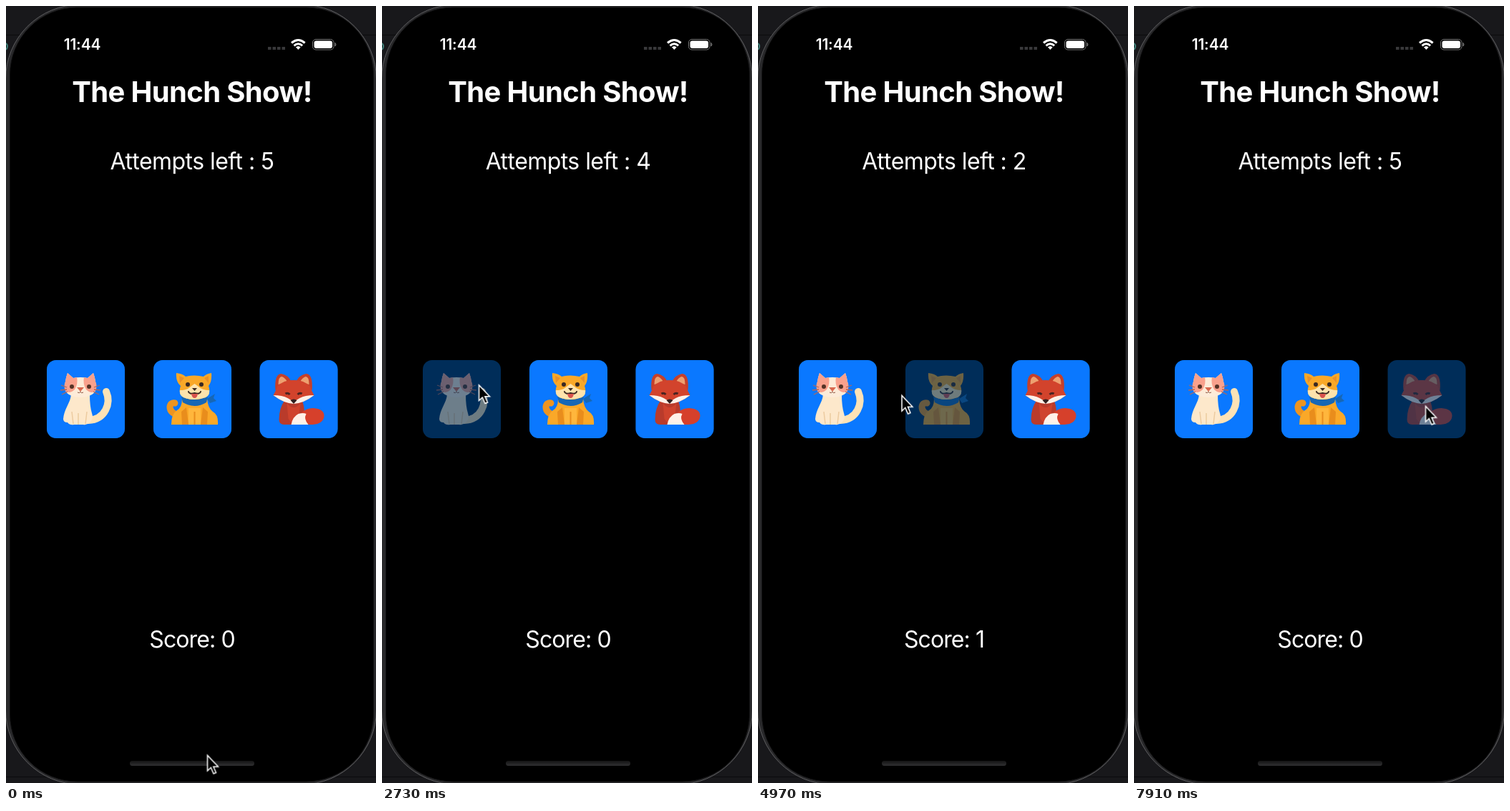
An HTML page for the animation above (8 s loop, 517 px wide and 1084 px high).

```html
<!DOCTYPE html>
<html lang="en">
<head>
<meta charset="utf-8">
<title>The Hunch Show!</title>
<style>
@property --on { syntax: "<number>"; inherits: true; initial-value: 1; }
html, body { margin: 0; width: 100%; height: 100%; overflow: hidden; background: #18181b; }
svg { display: block; width: 517px; height: 1084px; }
text { font-family: Inter, Roboto, sans-serif; fill: #fff; text-anchor: middle; }
.title { font-size: 40px; font-weight: 700; letter-spacing: -.65px; }
.label { font-size: 32px; letter-spacing: -.55px; }
.score { letter-spacing: -.9px; }
.clock { font-size: 21px; font-weight: 600; letter-spacing: -.15px; }

.tile .face { fill: #0a78ff; opacity: var(--on); }
.tile .art { opacity: calc(.43 + .57 * var(--on)); }
.tile, #cursor { animation: 8s linear infinite; }
#cat { animation-name: cat; }
#dog { animation-name: dog; }
#fox { animation-name: fox; }
@keyframes cat {
  0%, 32.74% { --on: 1 } 32.75%, 35.75% { --on: 0 }
  37%, 44.49% { --on: 1 } 44.5%, 47.25% { --on: 0 }
  48.5%, 74.74% { --on: 1 } 74.75%, 77.5% { --on: 0 }
  78.75%, 100% { --on: 1 }
}
@keyframes dog {
  0%, 60.74% { --on: 1 } 60.75%, 63.75% { --on: 0 } 65%, 100% { --on: 1 }
}
@keyframes fox {
  0%, 97.49% { --on: 1 } 97.5%, 100% { --on: 0 }
}

/* counters: each value is shown only in its own time window */
.count text { opacity: 0; animation: 8s step-end infinite; }
#left5 { animation-name: left5; }
#left4 { animation-name: left4; }
#left3 { animation-name: left3; }
#left2 { animation-name: left2; }
#left1 { animation-name: left1; }
#score0 { animation-name: score0; }
#score1 { animation-name: score1; }
@keyframes left5 { 0% { opacity: 1 } 33.5% { opacity: 0 } 98.25%, 100% { opacity: 1 } }
@keyframes left4 { 0% { opacity: 0 } 33.5% { opacity: 1 } 45.25%, 100% { opacity: 0 } }
@keyframes left3 { 0% { opacity: 0 } 45.25% { opacity: 1 } 61.5%, 100% { opacity: 0 } }
@keyframes left2 { 0% { opacity: 0 } 61.5% { opacity: 1 } 75.5%, 100% { opacity: 0 } }
@keyframes left1 { 0% { opacity: 0 } 75.5% { opacity: 1 } 98.25%, 100% { opacity: 0 } }
@keyframes score0 { 0% { opacity: 1 } 61.5% { opacity: 0 } 98.25%, 100% { opacity: 1 } }
@keyframes score1 { 0% { opacity: 0 } 61.5% { opacity: 1 } 98.25%, 100% { opacity: 0 } }

#cursor { animation-name: cursor; animation-timing-function: ease-in-out; }
@keyframes cursor {
  0%, 3% { transform: translate(281.5px, 1045.5px) }
  15.5%, 18% { transform: translate(136.5px, 530.5px) }
  22%, 49% { transform: translate(135.5px, 529px) }
  57%, 65% { transform: translate(201px, 543.5px) }
  72.5%, 80% { transform: translate(133.5px, 552px) }
  93%, 100% { transform: translate(407.5px, 558.5px) }
}
</style>
</head>
<body>
<svg viewBox="0 0 517 1084">
  <defs>
    <linearGradient id="bar" x2="0" y2="1">
      <stop stop-color="#141414"/><stop offset="1" stop-color="#303032"/>
    </linearGradient>
    <path id="catPatch" fill="#f9a18c" d="M29 18L37 25 42 24Q44 33 39 41 32 48 26 43 23 36 26 30 27 23 29 18Z"/>
    <path id="foxEar" d="M22 42Q20 20 30 19 39 20 45 31Z"/>
  </defs>

  <!-- desktop and phone body -->
  <rect width="517" height="1084" fill="#18181b"/>
  <path d="M0 40.5H517M0 1075.5H517" stroke="#0b0b0d"/>
  <path d="M0 52Q4 56 0 61" fill="none" stroke="#3f7f78" stroke-width="2"/>
  <rect x="-.5" y="-2" width="518" height="1088" rx="104" fill="#29292b" stroke="#5c5c5e"/>
  <rect x="5.5" y="2" width="508" height="1080" rx="94" stroke="#101011"/>

  <!-- status bar -->
  <text class="clock" x="106.5" y="61">11:44</text>
  <path d="M366 59H390" stroke="#39393b" stroke-width="4" stroke-dasharray="4.5 2"/>
  <g fill="none" stroke="#fff" stroke-width="3">
    <path d="M399 51.5Q408.3 43.5 417.6 51.5M402.5 55.3Q408.3 50.2 414.1 55.3"/>
    <path d="M405.5 57.5Q408.3 55.5 411.1 57.5L408.3 60.5Z" fill="#fff" stroke-width="1"/>
  </g>
  <rect x="428.5" y="46.5" width="29.5" height="14.5" rx="4.5" fill="none" stroke="#777"/>
  <rect x="430.5" y="48.5" width="25.5" height="10.5" rx="3" fill="#fff"/>
  <path d="M460 51.5Q462 53.8 460 56Z" fill="#777" stroke="#777"/>

  <text class="title" x="260" y="134">The Hunch Show!</text>
  <g class="label count">
    <text id="left5" x="260" y="228">Attempts left : 5</text>
    <text id="left4" x="260" y="228">Attempts left : 4</text>
    <text id="left3" x="260" y="228">Attempts left : 3</text>
    <text id="left2" x="260" y="228">Attempts left : 2</text>
    <text id="left1" x="260" y="228">Attempts left : 1</text>
    <text id="score0" class="score" x="260" y="895">Score: 0</text>
    <text id="score1" class="score" x="260" y="895">Score: 1</text>
  </g>

  <g transform="translate(57 494)"><g id="cat" class="tile">
    <rect width="109" height="109" rx="13" fill="#002d59"/>
    <rect class="face" width="109" height="109" rx="13"/>
    <g class="art">
      <path d="M58 84C82 83 90 60 83 44" fill="none" stroke="#fde2b6" stroke-width="10" stroke-linecap="round"/>
      <path d="M34 48C33 60 24 68 23 82Q23 87 29 87 32 91 38 90H51Q56 91 60 87 66 82 63 74 60 64 60 48Z" fill="#fde8cb"/>
      <path d="M35 72L37 89M44 74V90M56 72L54 89" fill="none" stroke="#eccba0" stroke-width="1.5"/>
      <path d="M29 18L37 25Q47 23 57 25L65 18Q67 23 68 30 74 51 47 52 20 51 26 30 27 23 29 18Z" fill="#fdebd8"/>
      <use href="#catPatch"/>
      <use href="#catPatch" transform="matrix(-1 0 0 1 94 0)"/>
      <path d="M28 38L20 35M28 41L19 42M29 44L21 48M66 38L74 35M66 41L75 42M65 44L73 48" stroke="#b0665a" stroke-width="1.3"/>
      <circle cx="35" cy="37" r="3" fill="#553326"/>
      <circle cx="59" cy="37" r="3" fill="#553326"/>
      <path d="M42 38H52L47 44Z" fill="#d9694f"/>
      <path d="M43 45Q46 47 47 44 48 47 51 45" fill="none" stroke="#8d5946"/>
    </g>
  </g></g>

  <g transform="translate(206 494)"><g id="dog" class="tile">
    <rect width="109" height="109" rx="13" fill="#002d59"/>
    <rect class="face" width="109" height="109" rx="13"/>
    <g class="art">
      <path d="M34 76Q23 74 23 65 24 59 30 60" fill="none" stroke="#ed9420" stroke-width="9" stroke-linecap="round"/>
      <path d="M40 54Q40 66 33 70 25 75 25 90H90Q91 76 83 72 76 67 75 54Z" fill="#faa828"/>
      <path d="M46 66L49 90H40L39 72ZM69 66L66 90H75L76 72Z" fill="#e98d1c"/>
      <path d="M49 67H66V90H49Z" fill="#ffb63c"/>
      <path d="M57.5 72V90" stroke="#e98d1c" stroke-width="2"/>
      <path d="M39 51Q57 59 76 51L74 59Q58 69 41 59Z" fill="#1767b5"/>
      <path d="M75 54L86 47 84 53 88 57 79 60Z" fill="#1767b5"/>
      <path d="M32 18Q41 19 45 23 57 20 70 23 74 19 81 18 82 30 77 36 81 47 73 52 57 58 42 52 34 47 38 36 31 30 32 18Z" fill="#faa828"/>
      <path d="M36 22L43 25 37 32ZM77 22L71 25 77 32Z" fill="#e8912a"/>
      <path d="M37 42Q47 42 52 37L57.5 33 63 37Q68 42 78 42 79 49 73 52 57 58 42 52 36 49 37 42Z" fill="#fee3ac"/>
      <circle cx="48" cy="34" r="3" fill="#3b2922"/>
      <circle cx="67" cy="34" r="3" fill="#3b2922"/>
      <path d="M54 39H61L57.5 43Z" fill="#3b2922"/>
      <path d="M49 44Q50 48 57.5 46 65 48 66 44" fill="none" stroke="#3b2922" stroke-width="2" stroke-linecap="round"/>
      <path d="M53 47H62Q61 53 57.5 53 54 53 53 47Z" fill="#d9534c"/>
    </g>
  </g></g>

  <g transform="translate(354.5 494)"><g id="fox" class="tile">
    <rect width="109" height="109" rx="13" fill="#002d59"/>
    <rect class="face" width="109" height="109" rx="13"/>
    <g class="art">
      <path d="M35 56Q27 67 27 83 27 90 34 90H58Q66 72 59 56Z" fill="#b93b2b"/>
      <path d="M38 60Q47 72 57 60L54 83 47 90 40 82Z" fill="#cf432d"/>
      <path d="M44 90Q52 88 55 79 61 67 75 67 90 68 90 78 89 89 74 90Z" fill="#d6402b"/>
      <path d="M44 90Q46 79 54 75 61 73 65 75 61 82 68 90Z" fill="#fff1e8"/>
      <g fill="#c5402a">
        <use href="#foxEar"/><use href="#foxEar" transform="matrix(-1 0 0 1 95 0)"/>
      </g>
      <path d="M26 34Q26 23 31 23 36 25 39 31ZM69 34Q69 23 64 23 59 25 56 31Z" fill="#eda070"/>
      <path d="M25 36Q35 27 47.5 28 60 27 70 36 73 44 76 49 62 60 47.5 61 33 60 19 49 22 44 25 36Z" fill="#d2432c"/>
      <path d="M19 49Q32 49 39 53L47.5 58 56 53Q63 49 76 49 62 60 47.5 61 33 60 19 49Z" fill="#fff1e8"/>
      <path d="M36 47Q39 45 42 48M53 48Q56 45 59 47" fill="none" stroke="#4a2421" stroke-width="3"/>
      <path d="M43 56Q47.5 53 52 56L47.5 61Z" fill="#32201f"/>
    </g>
  </g></g>

  <rect x="173" y="1053" width="174" height="7" rx="3.5" fill="url(#bar)"/>
  <path id="cursor" d="M0 0V21.500L4.800 17 8.500 25.500 12 24 8.400 15.800H15Z" stroke="#fff" stroke-width="1.5"/>
</svg>
</body>
</html>
```
